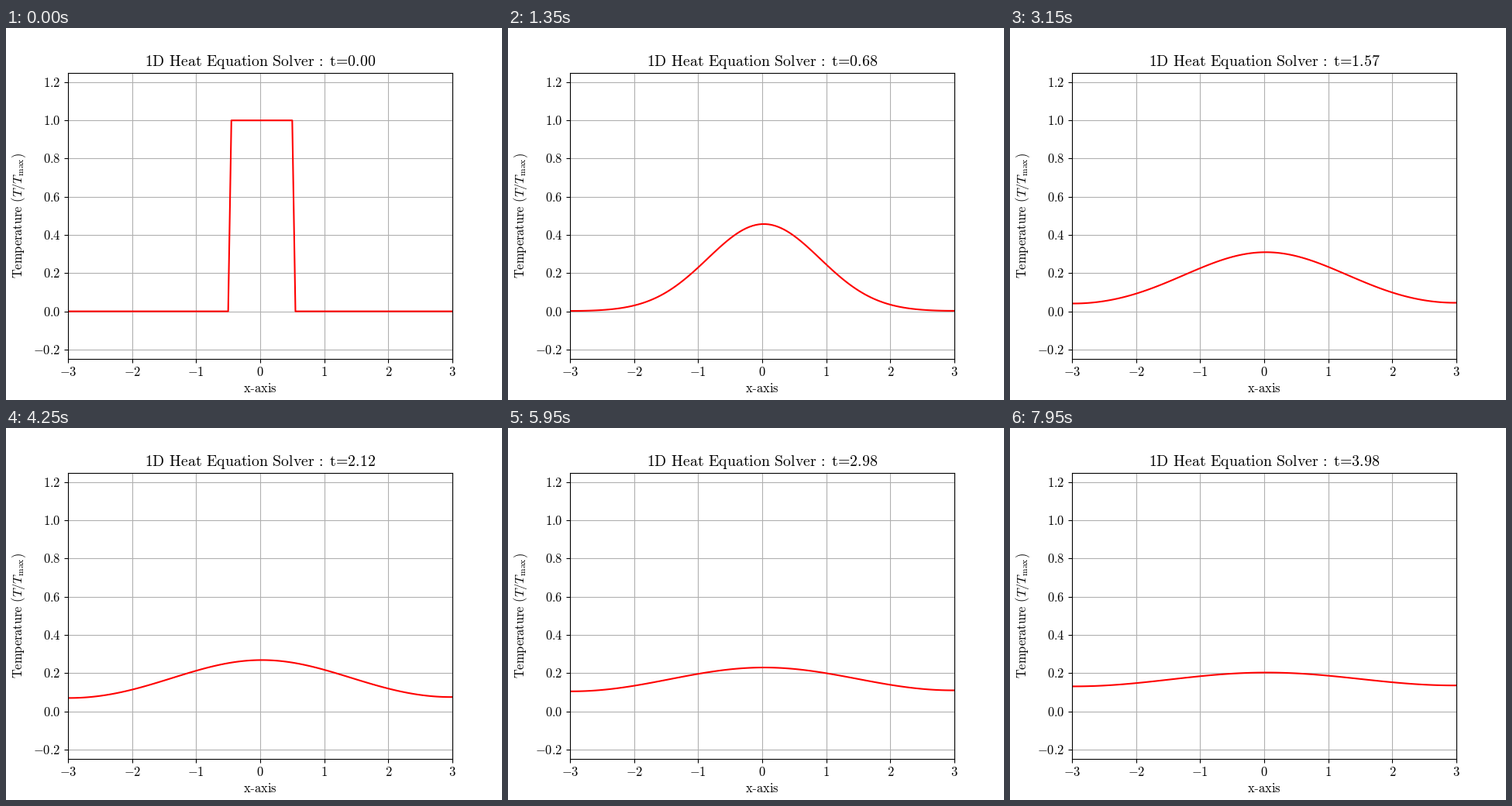
A matplotlib script for the animation above (8000 ms loop, 640 by 480 pixels).

```python
import numpy as np
import matplotlib.pyplot as plt
from matplotlib.animation import FuncAnimation

FRAMES, INTERVAL = 160, 50
RATE = 40            # frames per unit of simulated time
SUBSTEPS = 20
ALPHA = 0.5
SIZE, TITLE_SIZE = 11.85, 14.25

plt.rcParams.update({
    "font.family": "Liberation Serif",
    "mathtext.fontset": "cm",
    "font.size": SIZE,
})


def roman(text):
    """Typeset words in upright Computer Modern."""
    words = [rf"\text{{{word}}}" for word in text.split()]
    return r"\hspace{0.38}".join(words)


def solve():
    """Explicit heat equation with insulated ends, one row per frame."""
    x = np.linspace(-3, 3, 121)
    dx = x[1] - x[0]
    r = ALPHA / (RATE * SUBSTEPS) / dx**2
    u = np.where((x > -0.475) & (x < 0.525), 1.0, 0.0)
    rows = [u.copy()]
    for _ in range(FRAMES - 1):
        for _ in range(SUBSTEPS):
            u[1:-1] += r * (u[2:] - 2 * u[1:-1] + u[:-2])
            u[0], u[-1] = u[1], u[-2]
        rows.append(u.copy())
    return x, rows


x, rows = solve()

fig, ax = plt.subplots(figsize=(6.4, 4.8), dpi=100)
line, = ax.plot(x, rows[0], color="red", lw=1.5)
ax.set(xlim=(-3, 3), ylim=(-0.25, 1.25))
ax.grid(True)

xticks = range(-3, 4)
yticks = [k / 5 for k in range(-1, 7)]
ax.set_xticks(xticks, [f"${v}$" for v in xticks])
ax.set_yticks(yticks, [f"${v:.1f}$" for v in yticks])
ax.set_xlabel(f"${roman('x')}$-${roman('axis')}$")
fig.text(21.5 / 640, 1 - 242.4 / 480,
         "$" + roman("Temperature (") + r"T/T_{\text{max}}\text{)}$",
         rotation=90, rotation_mode="anchor", ha="center", va="baseline")
title = ax.set_title("", fontsize=TITLE_SIZE)


def draw(frame):
    line.set_ydata(rows[frame])
    head = roman("1D Heat Equation Solver :")
    clock = roman(f"t={frame / RATE:.2f}")
    title.set_text(rf"${head}\hspace{{0.5}}{clock}$")
    return line, title


anim = FuncAnimation(fig, draw, frames=FRAMES, interval=INTERVAL,
                     init_func=lambda: draw(0), repeat=True)
plt.show()
```
